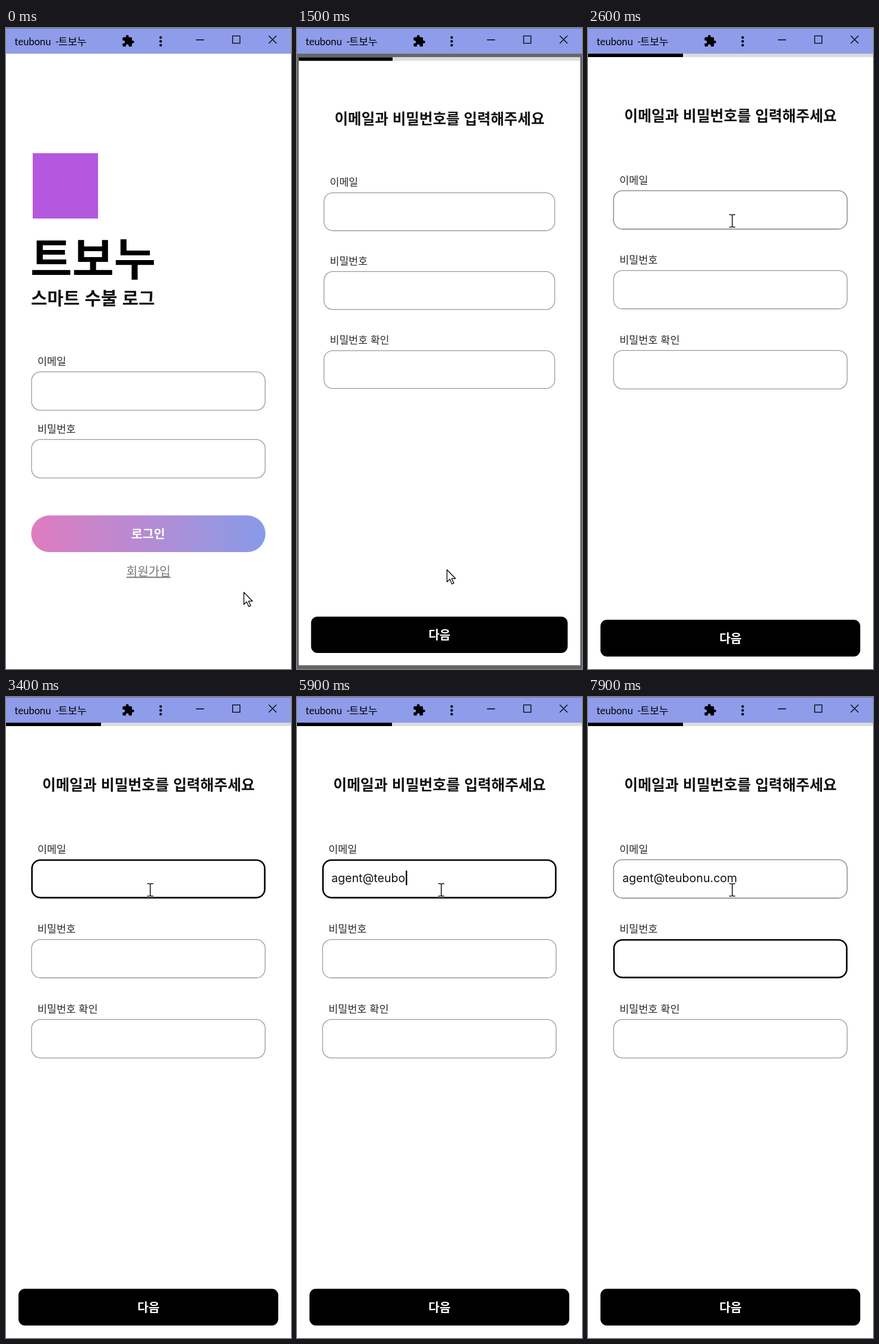
Write an HTML page that moves like this. It is 480 px wide and 1080 px high and loops after 8000 ms.

```html
<!DOCTYPE html>
<html lang="ko">
<head>
<meta charset="utf-8">
<title>teubonu</title>
<style>
  html, body { margin: 0; width: 100%; height: 100%; overflow: hidden; background: #fff; }
  svg { display: block; width: 100%; height: 100%; }
  text { font-family: "Noto Sans CJK KR", "Noto Sans CJK", sans-serif; white-space: pre; }
  .bold { font-weight: 700; }
  .mid { text-anchor: middle; }
  .label { font-size: 17.5px; fill: #2a2a2a; }
  .field { fill: #fff; stroke: #999; stroke-width: 1.3; }
  .bar text { font-size: 17.3px; }
  .bar .latin { font: 16.6px Lato, sans-serif; word-spacing: 3px; }
  #typed { font: 19.6px Inter, sans-serif; fill: #111; }
</style>
</head>
<body>
<svg viewBox="0 0 480 1080" preserveAspectRatio="none">
  <defs>
    <linearGradient id="pinkBlue">
      <stop offset="0" stop-color="#e07cc0"/>
      <stop offset="1" stop-color="#889be8"/>
    </linearGradient>
  </defs>

  <g id="login">
    <rect y="43" width="480" height="1037" fill="#fff"/>
    <rect x="45" y="211" width="110" height="110" fill="#b558e0"/>
    <text class="bold" x="41" y="417" font-size="76.5">트보누</text>
    <text class="bold" x="42" y="466" font-size="29.8" fill="#111">스마트 수불 로그</text>
    <g id="loginFields"></g>
    <rect x="42.4" y="821.3" width="394.6" height="61.7" rx="30.8" fill="url(#pinkBlue)"/>
    <text class="bold mid" x="239.5" y="859.5" font-size="20.6" fill="#fff">로그인</text>
    <text class="mid" x="240" y="922.5" font-size="20.2" fill="#777" text-decoration="underline">회원가입</text>
  </g>

  <rect id="scrim" y="43" width="480" height="1037"/>

  <g id="signup">
    <rect y="43" width="480" height="1037" fill="#fff"/>
    <rect y="43" width="480" height="6" fill="#dcdcdc"/>
    <rect y="43" width="160" height="6"/>
    <text class="bold mid" x="240" y="157" font-size="24.95" fill="#111">이메일과 비밀번호를 입력해주세요</text>
    <g id="signupFields"></g>
    <text id="typed" x="58" y="312"></text>
    <rect id="caret" width="2.4" height="24.5"/>
    <rect x="21" y="997" width="437.5" height="62" rx="11"/>
    <text class="bold mid" x="240" y="1036" font-size="20.4" fill="#fff">다음</text>
  </g>

  <g class="bar">
    <rect width="480" height="43.3" fill="#8e9cea"/>
    <rect width="480" height="1" fill="#6873b0"/>
    <text class="latin" x="14.5" y="28.5">teubonu -</text>
    <text x="88" y="29">트보누</text>
    <path transform="translate(194.500 10.900) scale(.93)" d="M20.5 11H19V7c0-1.100-.9-2-2-2h-4V3.500a2.500 2.500 0 0 0-5 0V5H4c-1.100 0-2 .9-2 2v3.800h1.500a2.700 2.700 0 0 1 0 5.400H2V20c0 1.100.9 2 2 2h3.800v-1.500a2.700 2.700 0 0 1 5.400 0V22H17c1.100 0 2-.9 2-2v-4h1.500a2.500 2.500 0 0 0 0-5z"/>
    <circle cx="260.500" cy="16" r="2.200"/>
    <circle cx="260.500" cy="22.500" r="2.200"/>
    <circle cx="260.500" cy="29" r="2.200"/>
    <path d="M320 20h13.500M381.700 13.300h12.300v12.300h-12.300zM442.500 13l13 13m0-13l-13 13" fill="none" stroke="#000" stroke-width="1.300"/>
  </g>

  <g id="cursor" fill="#fff" stroke="#000" stroke-width="1.300" stroke-linejoin="round">
    <path id="arrow" d="M.6.8v20.400l4.700-4.400 3.600 8 3.200-1.400-3.500-7.700h6.500z"/>
    <path id="hand" d="M8 19V3a2.200 2.200 0 0 1 4.400 0v8c.2-2 3.700-2 3.900.3.6-1.600 3.300-1.400 3.500.8.8-1.300 3.200-.8 3.200 1.200v8c0 4-2.300 5-2.800 9H10.500c-.4-4-4-6-7.500-11-1.800-2.600-.4-5 1.700-4 1.300.6 2.300 2.200 3.300 3.700zM12.400 11v5M16.300 11.500V16.500M19.800 12.500V17"/>
    <g id="beam" fill="none">
      <path d="M-5-10.500h3.500L0-9.500l1.500-1H5M0-9.500V9.500M-5 10.500h3.500L0 9.500l1.500 1H5" stroke="#fff" stroke-width="3.400"/>
      <path d="M-5-10.500h3.500L0-9.500l1.500-1H5M0-9.500V9.500M-5 10.500h3.500L0 9.500l1.500 1H5" stroke-width="1.400"/>
    </g>
  </g>
</svg>

<script>
const LOOP = 8000, STEP = 100;
const EMAIL = 'agent@teubonu.com';
const KEYS = [3500, 3700, 3900, 4100, 4300, 4500, 5300, 5500, 5600, 5700, 5900, 6100, 6300, 6400, 6500, 6700, 6800];
const ROUTE_START = 1361, ROUTE_MS = 300;
const FOCUS_EMAIL = 2850, FOCUS_PASS = 7260, FOCUS_MS = 167;
const FIELD_TOPS = [273.4, 407.9, 542.7];
const FIELD = { x: 42.4, w: 394.7, h: 66, r: 15.6 };
// time, x, y
const PATH = [[100, 400, 950], [300, 405, 962], [500, 385, 955], [1100, 253, 913], [1300, 252, 912], [1900, 252, 912], [2500, 243, 325]];

const $ = id => document.getElementById(id);
const clamp = v => Math.min(1, Math.max(0, v));
const ramp = (t, from, to) => clamp((t - from) / (to - from));
const mix = (a, b, k) => a + (b - a) * k;
const show = (el, on) => el.setAttribute('visibility', on ? 'visible' : 'hidden');

function setAttrs(el, attrs) {
  for (const name in attrs) el.setAttribute(name, attrs[name]);
}

// The border lies inside the field's box.
function drawBorder(el, top, focus, hover) {
  const c = Math.round((hover ? 125 : 153) * (1 - focus));
  const w = mix(1.3, 2.6, focus);
  setAttrs(el, {
    x: FIELD.x + w / 2, y: top + w / 2,
    width: FIELD.w - w, height: FIELD.h - w, rx: FIELD.r - w / 2
  });
  el.style.stroke = `rgb(${c},${c},${c})`;
  el.style.strokeWidth = w;
}

function addField(parent, label, top) {
  parent.insertAdjacentHTML('beforeend',
    `<text class="label" x="53" y="${top - 10.6}">${label}</text><rect class="field"/>`);
  const box = parent.lastElementChild;
  drawBorder(box, top, 0, false);
  return box;
}

function bezier(x1, y1, x2, y2) {
  const at = (a, b, s) => 3 * (1 - s) ** 2 * s * a + 3 * (1 - s) * s * s * b + s ** 3;
  return x => {
    let lo = 0, hi = 1;
    for (let i = 0; i < 24; i++) {
      const s = (lo + hi) / 2;
      if (at(x1, x2, s) < x) lo = s; else hi = s;
    }
    return at(y1, y2, lo);
  };
}
const zoomA = bezier(.05, 0, .1333, .06), zoomB = bezier(.2083, .82, .25, 1);
const zoom = p => p < 1 / 6 ? .4 * zoomA(p * 6) : .4 + .6 * zoomB((p - 1 / 6) * 1.2);

addField($('loginFields'), '이메일', 578.7);
addField($('loginFields'), '비밀번호', 692.7);
const fields = ['이메일', '비밀번호', '비밀번호 확인'].map((name, i) => addField($('signupFields'), name, FIELD_TOPS[i]));

function scalePage(el, s) {
  el.setAttribute('transform', `translate(240 561.75) scale(${s}) translate(-240 -561.75)`);
}

function drawRoute(t) {
  const p = ramp(t, ROUTE_START, ROUTE_START + ROUTE_MS), e = zoom(p);
  scalePage($('login'), 1 + .05 * e);
  scalePage($('signup'), .85 + .15 * e);
  $('scrim').setAttribute('opacity', .6 * ramp(p, .2075, .4175));
  $('signup').setAttribute('opacity', ramp(p, .125, .25));
}

function drawForm(t, hovered) {
  const pass = ramp(t, FOCUS_PASS, FOCUS_PASS + FOCUS_MS);
  const email = ramp(t, FOCUS_EMAIL, FOCUS_EMAIL + FOCUS_MS) * (1 - pass);
  [email, pass, 0].forEach((f, i) => drawBorder(fields[i], FIELD_TOPS[i], f, hovered === i));

  const typed = KEYS.filter(k => k <= t);
  $('typed').textContent = EMAIL.slice(0, typed.length);

  const inPass = t >= 7400;
  const since = inPass ? 7400 : typed.length ? typed[typed.length - 1] : 2900;
  const width = inPass || !typed.length ? 0 : $('typed').getComputedTextLength();
  setAttrs($('caret'), { x: 58.8 + width, y: inPass ? 427 : 292.5 });
  show($('caret'), t >= since && (t - since) % 1000 < 500);
}

function pointer(t) {
  const i = PATH.findIndex(p => p[0] > t);
  if (i === 0) return PATH[0].slice(1);
  if (i < 0) return PATH[PATH.length - 1].slice(1);
  const [t0, x0, y0] = PATH[i - 1], [t1, x1, y1] = PATH[i];
  const u = ramp(t, t0, t1), k = u * u * (3 - 2 * u);
  return [mix(x0, x1, k), mix(y0, y1, k)];
}

function drawCursor(t, x, y, hovered) {
  const hand = t < 1500 && x < 272 && y > 900 && y < 930;
  $('cursor').setAttribute('transform', `translate(${x} ${y})`);
  show($('hand'), hand);
  show($('beam'), hovered >= 0);
  show($('arrow'), !hand && hovered < 0);
}

function render(t) {
  const [x, y] = pointer(t);
  const hovered = t < 1500 ? -1 : FIELD_TOPS.findIndex(top => y > top && y < top + FIELD.h);
  drawRoute(t);
  drawForm(t, hovered);
  drawCursor(t, x, y, hovered);
}

const start = performance.now();
function tick() {
  const t = (performance.now() - start) % LOOP;
  render(Math.floor(t / STEP) * STEP);
  requestAnimationFrame(tick);
}
tick();
</script>
</body>
</html>
```
